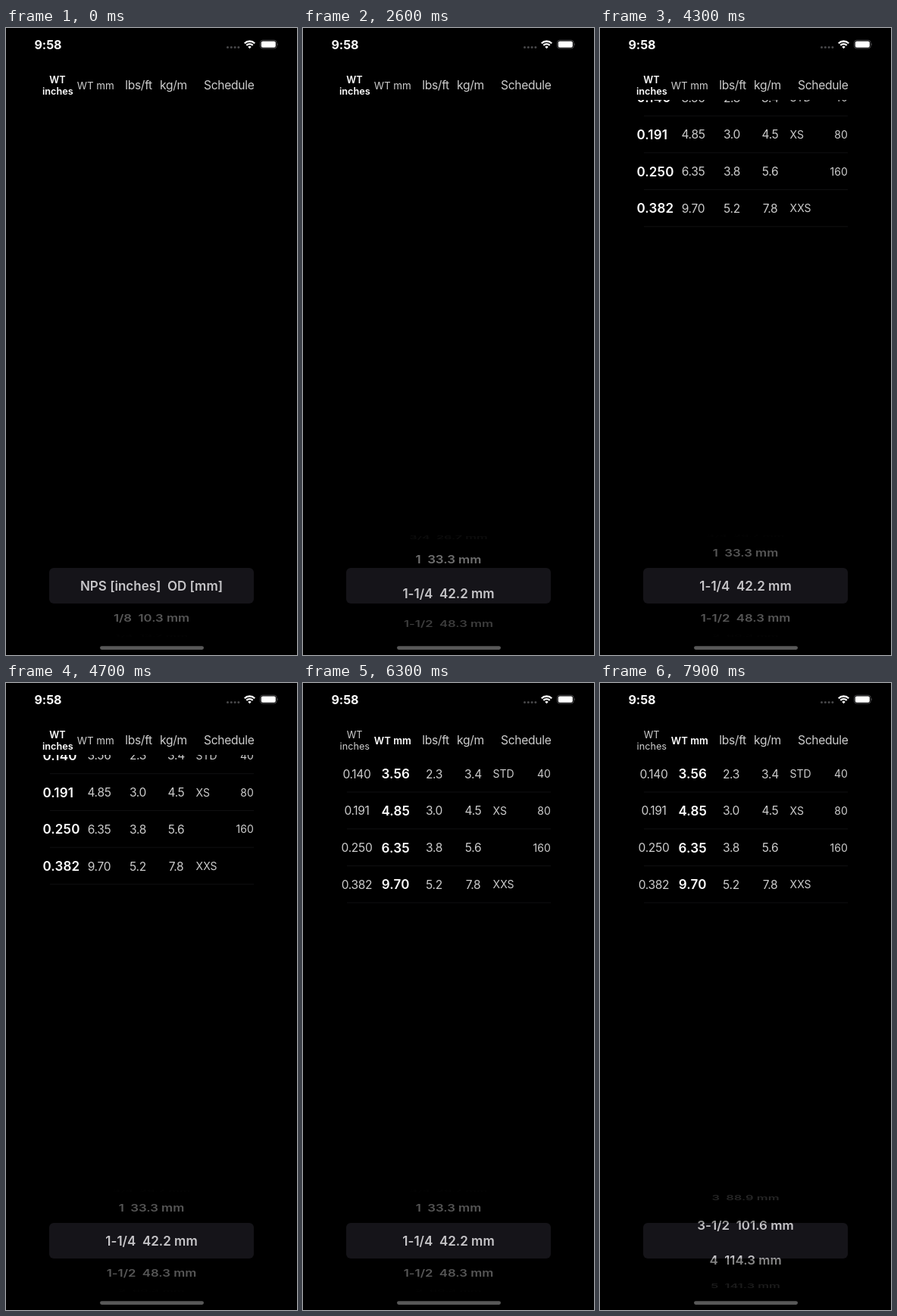
An HTML page that plays this animation: 384x828 px, repeating every 8000 ms.

```html
<!DOCTYPE html>
<html lang="en">
<head>
<meta charset="utf-8">
<title>Pipe schedule</title>
<style>
  html, body { margin: 0; width: 100%; height: 100%; overflow: hidden; background: #000; }
  svg { display: block; width: 100vw; height: 100vh; }
  text {
    font: 15.5px Inter, Roboto, sans-serif;
    font-feature-settings: "calt" 0;
    letter-spacing: -.3px;
    fill: #cdcdcd;
  }
  .bold { font-size: 17px; font-weight: 600; letter-spacing: .15px; fill: #fff; }
  .small { font-size: 14px; letter-spacing: 0; }
  .head { font-size: 15.6px; letter-spacing: -.3px; }
  .unit { font-size: 12.7px; letter-spacing: 0; }
  .unit.mm { font-size: 13.4px; }
  .unit.on { font-weight: 600; fill: #fff; }
  .unit.mm.on { font-size: 13.1px; }
  .clock { font-size: 16px; font-weight: 700; letter-spacing: 0; fill: #fff; }
  .wheel text { font-size: 17px; font-weight: 600; letter-spacing: 0; text-anchor: middle; }
  #far text { fill: #fff; }
  #near text { fill: #c6c5c8; }
</style>
</head>
<body>
<svg viewBox="0 0 384 828" preserveAspectRatio="none">
  <defs>
    <clipPath id="listClip"><rect y="95" width="384" height="560"/></clipPath>
    <clipPath id="bandClip"><rect x="57" y="713" width="270" height="47"/></clipPath>
  </defs>

  <text class="clock" x="37.4" y="27.5">9:58</text>
  <g fill="#48484a">
    <circle cx="292.5" cy="25.5" r="1.5"/><circle cx="297.3" cy="25.5" r="1.5"/>
    <circle cx="302.1" cy="25.5" r="1.5"/><circle cx="306.9" cy="25.5" r="1.5"/>
  </g>
  <g fill="none" stroke="#fff" stroke-width="2.3">
    <path d="M314.8 20.2a9.6 9.6 0 0 1 13.4 0"/>
    <path d="M317.3 22.9a6 6 0 0 1 8.4 0"/>
  </g>
  <path d="M319.3 24.9a3.2 3.2 0 0 1 4.4 0L321.5 27.2z" fill="#fff"/>
  <rect x="335.5" y="16.2" width="21.6" height="10.8" rx="3.2" fill="none" stroke="#4c4c4e"/>
  <rect x="336.8" y="17.5" width="19" height="8.2" rx="2" fill="#fff"/>
  <path d="M358.3 19.8q1.5 1.8 0 3.6z" fill="#5c5c5e"/>

  <text class="head" x="157.2" y="81.1">lbs/ft</text>
  <text class="head" x="203" y="81.1">kg/m</text>
  <text class="head" x="261" y="81.1">Schedule</text>
  <g id="heads"></g>

  <g clip-path="url(#listClip)"><g id="list"></g></g>

  <g id="far" class="wheel"></g>
  <rect x="57" y="713" width="270" height="47" rx="6" fill="#151419"/>
  <g clip-path="url(#bandClip)"><g id="near" class="wheel"></g></g>

  <rect x="124" y="816.3" width="137" height="4.6" rx="2.3" fill="#585858"/>
</svg>

<script>
const LOOP = 8000;
const $ = id => document.getElementById(id);

function add(parent, tag, attrs, content = '') {
  const el = document.createElementNS('http://www.w3.org/2000/svg', tag);
  for (const key in attrs) el.setAttribute(key, attrs[key]);
  el.textContent = content;
  parent.append(el);
  return el;
}

function label(parent, content, x, y, anchor = 'start', cls = '') {
  return add(parent, 'text', { x, y, 'text-anchor': anchor, class: cls }, content);
}

// Table, built once per highlighted unit
const rows = [
  ['0.140', '3.56', '2.3', '3.4', 'STD', '40'],
  ['0.191', '4.85', '3.0', '4.5', 'XS', '80'],
  ['0.250', '6.35', '3.8', '5.6', '', '160'],
  ['0.382', '9.70', '5.2', '7.8', 'XXS', ''],
];

function buildMode(metric) {
  const head = add($('heads'), 'g'), body = add($('list'), 'g');
  const inch = metric ? 'unit' : 'unit on';
  label(head, 'WT', 68, 72.5, 'middle', inch);
  label(head, 'inches', 68.3, 87.7, 'middle', inch);
  label(head, 'WT mm', 118.3, 80.5, 'middle', metric ? 'unit mm on' : 'unit mm');

  rows.forEach(([wt, mm, lbs, kg, name, num], i) => {
    const mid = 120.1 + i * 48.7, y = mid + 5.6, yBold = mid + 6.1;
    if (metric) {
      label(body, wt, 71, y, 'middle');
      label(body, mm, 122.2, yBold, 'middle', 'bold');
    } else {
      label(body, wt, 48.4, yBold, 'start', 'bold');
      label(body, mm, 123, y, 'middle');
    }
    label(body, lbs, metric ? 173 : 174, y, 'middle');
    label(body, kg, 224.5, y, 'middle');
    label(body, name, 250.6, mid + 5.2, 'start', 'small');
    label(body, num, 326.8, mid + 5.2, 'end', 'small');
    add(body, 'rect', { x: 58, y: mid + 23.4, width: 269, height: 1, fill: '#101012' });
  });
  return [head, body];
}
const inchMode = buildMode(false), metricMode = buildMode(true);

// Picker wheel
const RADIUS = 67, STEP = 0.697, MID_X = 192, MID_Y = 736.5;
const sizes = `1/8 10.3,1/4 13.7,3/8 17.1,1/2 21.3,3/4 26.7,1 33.3,1-1/4 42.2,1-1/2 48.3,
  2 60.3,2-1/2 73.0,3 88.9,3-1/2 101.6,4 114.3,5 141.3,6 168.3`.split(',');
const gap = '\u00a0\u00a0';
const items = ['NPS [inches]' + gap + 'OD [mm]',
  ...sizes.map(s => s.trim().replace(' ', gap) + ' mm')];
const wheel = items.map(s => [label($('far'), s, 0, 6.2), label($('near'), s, 0, 6.2)]);

function drawWheel(pos) {
  wheel.forEach(([far, near], i) => {
    const angle = (i - pos) * STEP, cos = Math.cos(angle);
    const shown = Math.abs(angle) < 1.45;
    const sx = 1 - 0.06 * (1 - cos);
    const move = `translate(${MID_X} ${MID_Y + RADIUS * Math.sin(angle)}) scale(${sx} ${cos})`;
    for (const el of [far, near]) {
      el.style.display = shown ? '' : 'none';
      if (shown) el.setAttribute('transform', move);
    }
    if (shown) far.setAttribute('opacity', 0.62 * cos ** 2.3);
  });
}

// Finger push from a to b, then decay towards the end row
function flick(t, { start, release, a, b, end, power, tau }) {
  if (t < start) return a;
  if (t < release) return a + (b - a) * ((t - start) / (release - start)) ** power;
  const dt = t - release, settle = Math.max(0, 1 - (dt / 2000) ** 8);
  return end - (end - b) * Math.exp(-dt / tau) * settle;
}
const flick1 = { start: 1000, release: 1300, a: 0, b: 2.1, end: 7, power: 1.65, tau: 425 };
const flick2 = { start: 6700, release: 7000, a: 7, b: 9.23, end: 13, power: 1.1, tau: 472 };

// Overscroll of the list and its spring back
function scrollY(t) {
  const clamp = u => Math.min(1, Math.max(0, u));
  const up = Math.sin(clamp((t - 4000) / 480) * Math.PI / 2);
  const back = clamp((t - 4480) / 640);
  return -33.5 * up * (1 - back * back * (3 - 2 * back));
}

function show(els, on) {
  for (const el of els) el.style.display = on ? '' : 'none';
}

const begin = performance.now();
function frame() {
  const t = (performance.now() - begin) % LOOP;
  const metric = t >= 5700;
  show(inchMode, !metric);
  show(metricMode, metric);
  show([$('list')], t >= 3200);
  $('list').setAttribute('transform', `translate(0 ${scrollY(t)})`);
  drawWheel(flick(t, t < 5000 ? flick1 : flick2));
  requestAnimationFrame(frame);
}
frame();
</script>
</body>
</html>
```
